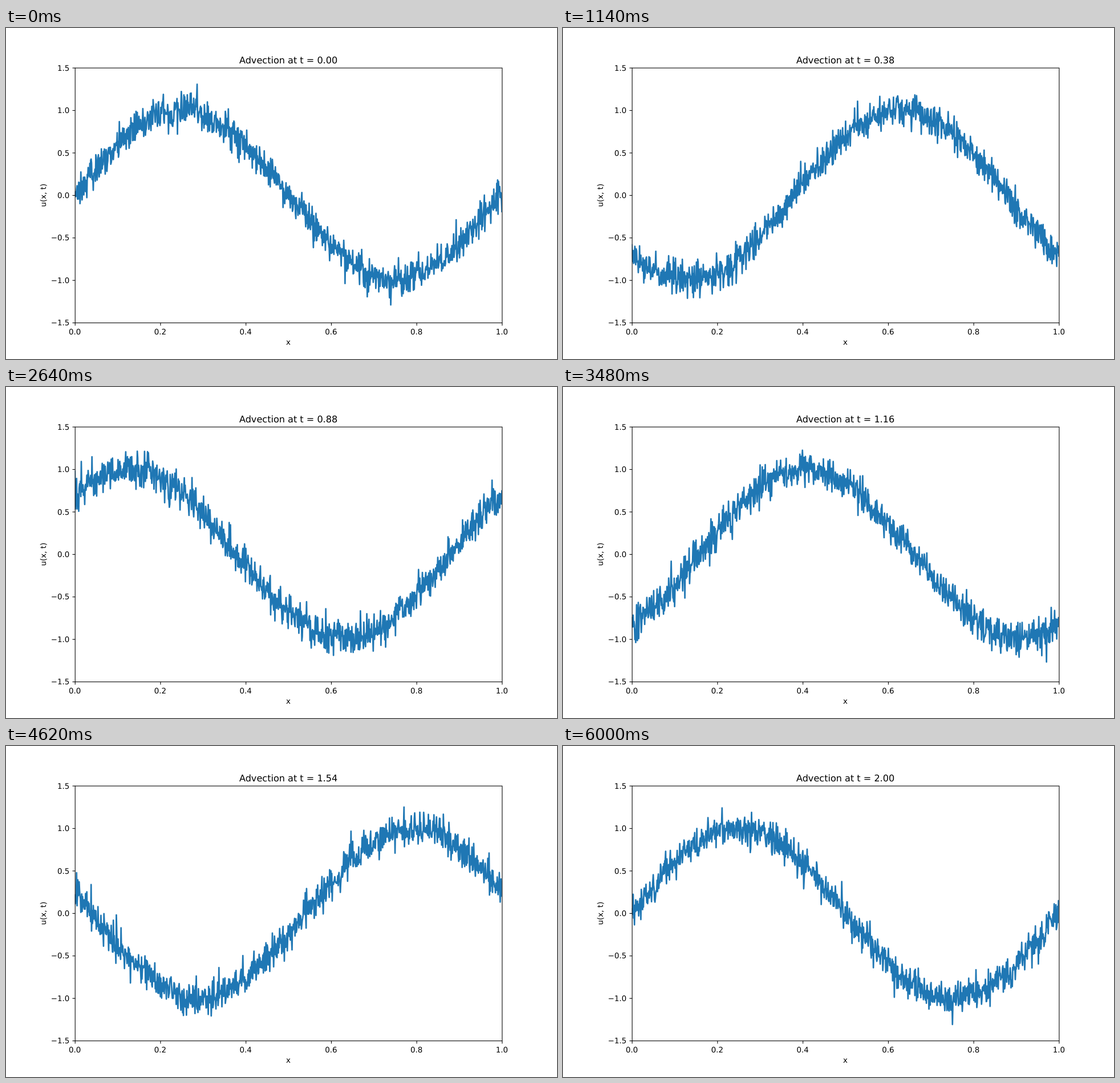
Write an HTML page that moves like this. It is 966 px wide and 580 px high and loops after 6030 ms.

```html
<!DOCTYPE html>
<html lang="en">
<head>
<meta charset="utf-8">
<title>Advection</title>
<style>
  html, body { margin: 0; width: 100%; height: 100%; overflow: hidden; background: #fff; }
  svg { display: block; }
  text { font: 13.89px "DejaVu Sans", sans-serif; text-anchor: middle; text-rendering: geometricPrecision; }
  #title { font-size: 16.67px; }
  .y { text-anchor: end; }
  .axes { fill: none; stroke: #000; stroke-width: 1.11; }
  #curve { fill: none; stroke: #1f77b4; stroke-width: 2.78; stroke-linejoin: round; stroke-linecap: square; }
</style>
</head>
<body>
<!-- The chart is laid out on a 1000 x 600 figure and scaled to the stage. -->
<svg width="966" height="580" viewBox="0 0 1000 600" preserveAspectRatio="none">
  <clipPath id="plot"><rect x="125" y="72" width="775" height="462"/></clipPath>
  <path id="curve" clip-path="url(#plot)"/>
  <g id="ticks"></g>
  <rect class="axes" x="125.5" y="72.5" width="775" height="462"/>
  <text id="title" x="512.5" y="64"></text>
  <text x="512.5" y="574">x</text>
  <text transform="translate(72.8 303.2) rotate(-90)">u(x, t)</text>
</svg>
<script>
const STEP = 30, STEPS = 201, POINTS = 1000, NOISE = 0.1;
const left = 125, width = 775, top0 = 72, height = 462;
const px = x => left + x * width;
const py = u => top0 + (1.5 - u) / 3 * height;
const curve = document.getElementById('curve');
const title = document.getElementById('title');

function drawTicks() {
  let out = '';
  for (let i = 0; i <= 5; i++) {
    const x = px(i / 5);
    out += `<path class="axes" d="M${x + 0.5} ${top0 + height + 0.5}v4.86"/>` +
      `<text x="${x}" y="555">${(i / 5).toFixed(1)}</text>`;
  }
  for (let i = -3; i <= 3; i++) {
    const y = py(i / 2);
    const label = (i / 2).toFixed(1).replace('-', '\u2212');
    out += `<path class="axes" d="M${left + 0.5} ${y + 0.5}h-4.86"/>` +
      `<text class="y" x="115.3" y="${y + 5.3}">${label}</text>`;
  }
  document.getElementById('ticks').innerHTML = out;
}

// Seeded uniform generator, so each step always gets the same noise.
function random(seed) {
  return () => {
    seed = (seed + 0x6D2B79F5) | 0;
    let v = Math.imul(seed ^ (seed >>> 15), 1 | seed);
    v = (v + Math.imul(v ^ (v >>> 7), 61 | v)) ^ v;
    return ((v ^ (v >>> 14)) >>> 0) / 4294967296;
  };
}

const gauss = rand =>
  Math.sqrt(-2 * Math.log(1 - rand())) * Math.cos(2 * Math.PI * rand());

function draw(step) {
  const t = step / 100;
  const rand = random((step + 1) * 7919);
  const points = Array.from({ length: POINTS }, (_, i) => {
    const x = i / (POINTS - 1);
    const u = Math.sin(2 * Math.PI * (x - t)) + NOISE * gauss(rand);
    return px(x).toFixed(2) + ' ' + py(u).toFixed(2);
  });
  curve.setAttribute('d', 'M' + points.join('L'));
  title.textContent = `Advection at t = ${t.toFixed(2)}`;
}

let shown = -1;
const start = performance.now();
function tick() {
  const step = Math.floor((performance.now() - start) / STEP) % STEPS;
  if (step !== shown) draw(shown = step);
  requestAnimationFrame(tick);
}

drawTicks();
tick();
</script>
</body>
</html>
```
